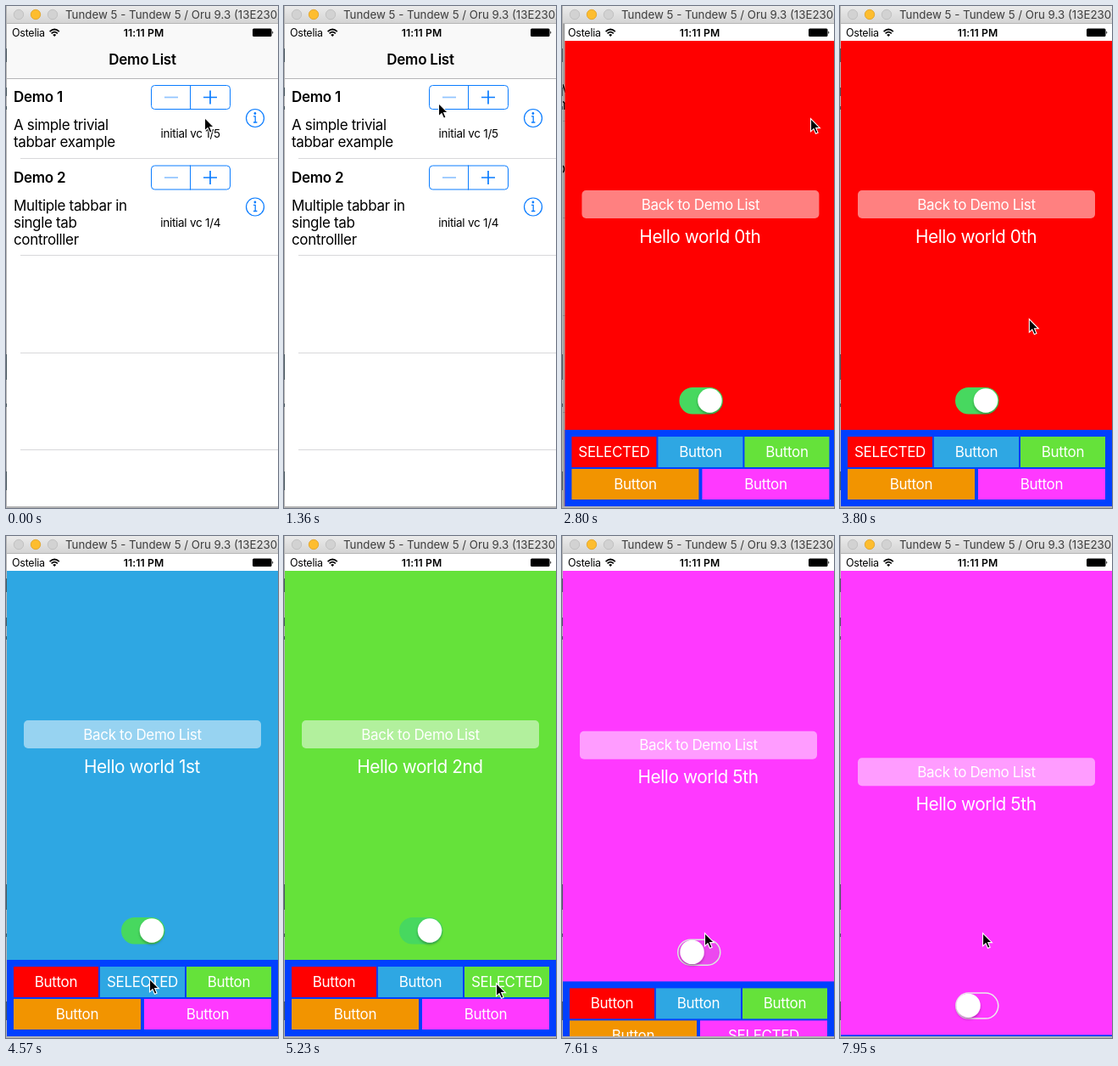
These frames come from a looping animation (321 by 591 pixels, 8000 ms). An HTML page:

```html
<!DOCTYPE html>
<html lang="en">
<head>
<meta charset="utf-8">
<title>Tab bar demo</title>
<style>
  html, body { margin: 0; width: 100%; height: 100%; overflow: hidden; background: #fff; }
  svg { display: block; width: 321px; height: 591px; }
  text { font-family: Inter, Roboto, sans-serif; font-size: 17px; letter-spacing: -.02em; white-space: pre; }
  .mid { text-anchor: middle; }
  .bold { font-weight: 600; letter-spacing: -.015em; }
  .light { fill: #fff; }
  .tint { stroke: #0a7cff; fill: none; }
</style>
</head>
<body>
<svg id="stage" viewBox="0 0 321 591">
  <defs>
    <clipPath id="screenClip"><rect x="1" y="21" width="320" height="568"/></clipPath>
    <linearGradient id="bar" x2="0" y2="1">
      <stop stop-color="#ebebeb"/><stop offset="1" stop-color="#d3d3d3"/>
    </linearGradient>
    <linearGradient id="edge">
      <stop stop-opacity="0"/><stop offset="1" stop-opacity=".35"/>
    </linearGradient>
    <filter id="soft" x="-30%" y="-30%" width="160%" height="180%">
      <feDropShadow dx="0" dy="2" stdDeviation="1.5" flood-opacity=".3"/>
    </filter>
  </defs>
  <rect width="321" height="591" fill="#b4b4b4"/>
  <path d="M.5 50v16M.5 96v10M.5 118v4M.5 410v30M.5 468v4M.5 548v22" stroke="#4b5a60"/>
  <g clip-path="url(#screenClip)">
    <rect width="321" height="591" fill="#fff"/>
    <g id="list"></g>
    <g id="nav">
      <rect y="21" width="321" height="64" fill="#f9f9f9"/>
      <path d="M0 85.5H321" stroke="#b5b5b8"/>
      <text class="mid bold" x="161" y="69">Demo List</text>
    </g>
    <rect id="dim" y="21" width="321" height="570"/>
    <g id="page">
      <rect x="-9" y="21" width="10" height="570" fill="url(#edge)"/>
      <rect x="1" y="21" width="320" height="20" fill="#fff"/>
      <rect id="fill" x="1" y="41" width="320" height="550"/>
      <g id="center">
        <rect x="21" y="217" width="280" height="33" rx="5" fill="#fff" fill-opacity=".5"/>
        <text class="mid light" x="161" y="239.5">Back to Demo List</text>
        <text id="hello" class="mid light" x="160.5" y="278.7" style="font-size:20.8px"></text>
      </g>
      <g id="toggle">
        <rect id="track" x="136.75" y="449.75" width="50" height="30" rx="15" stroke-width="1.5"/>
        <circle id="knob" cy="464.5" r="14.2" fill="#fff" filter="url(#soft)"/>
      </g>
      <g id="tabs"><rect x="1" y="499" width="320" height="90" fill="#0040ff"/></g>
    </g>
    <g id="status">
      <text x="7" y="35.5" style="font-size:12.5px">Ostelia</text>
      <text class="mid bold" x="162.5" y="35.5" style="font-size:12.2px;letter-spacing:.01em">11:11 PM</text>
      <path d="M51.6 30.2q5.6-5.4 11.2 0M53.6 32.3q3.6-3.4 7.2 0" fill="none" stroke="#000" stroke-width="1.7"/>
      <path d="M57.2 36l-2-2.1q2-1.7 4 0z"/>
      <rect x="291" y="26.5" width="22.5" height="9.5" rx="1.5"/>
      <path d="M314.3 29.5q2 1.7 0 3.4z"/>
    </g>
  </g>
  <rect x="1" width="320" height="21" fill="url(#bar)"/>
  <path d="M1 20.5H321" stroke="#b6b6b6"/>
  <g stroke-width=".8">
    <circle cx="15" cy="10" r="5.7" fill="#d2d2d2" stroke="#bcbcbc"/>
    <circle cx="35" cy="10" r="5.7" fill="#fdbd2f" stroke="#dfa023"/>
    <circle cx="55" cy="10" r="5.7" fill="#d2d2d2" stroke="#bcbcbc"/>
  </g>
  <text x="70" y="15" fill="#3d3d3d" style="font-size:13.3px;letter-spacing:0">Tundew 5 - Tundew 5 / Oru 9.3 (13E230)</text>
  <path id="cursor" d="M0 0V15.3L3.5 12.1 6 17.8 8.6 16.7 6.2 11.1H10.9Z" stroke="#fff" stroke-width="1.1"/>
</svg>
<script>
const LOOP = 8000, PUSH = 2420, HIDE = 7410;
const $ = id => document.getElementById(id);
const move = (el, x, y) => el.setAttribute('transform', `translate(${x} ${y})`);
const clamp = v => Math.min(1, Math.max(0, v));
const ease = v => v * v * (3 - 2 * v);
const span = (t, from, to) => ease(clamp((t - from) / (to - from)));

// start, end, x, y
const moves = [
  [50, 280, 234, 108], [950, 1120, 182, 114], [1400, 1650, 302, 140],
  [1850, 2060, 293, 132], [2960, 3210, 262, 257], [3470, 4210, 169, 521],
  [4710, 4990, 250, 526], [5340, 5750, 80, 557], [6060, 6390, 217, 563],
  [6620, 7140, 168, 467]
];

// selected at, colour, ordinal, x, y, width
const tabs = [
  [0, '#ff0000', '0th', 9, 507, 100], [4570, '#2ea7e3', '1st', 111, 507, 100],
  [5230, '#65e23a', '2nd', 213, 507, 100], [6040, '#f29400', '3rd', 9, 545, 150],
  [6560, '#ff39ff', '5th', 163, 545, 150]
];

const cell = (n, y, lines, noteY, infoY) => `
  <text class="bold" x="9" y="${y + 28}">Demo ${n}</text>
  ${lines.map((s, i) => `<text x="9" y="${y + 61 + i * 20.3}">${s}</text>`).join('')}
  <g class="tint">
    <rect x="171.5" y="${y + 8.5}" width="93" height="28" rx="4"/>
    <path d="M217.5 ${y + 8}v29"/>
    <path d="M233 ${y + 22.5}h16m-8-8v16" stroke-width="1.7"/>
    <path id="minus${n}" d="M187 ${y + 22.5}h16" stroke-width="1.7" opacity=".45"/>
    <circle cx="294" cy="${infoY}" r="10.5" stroke-width="1.2"/>
    <path d="M292 ${infoY - 2.2}h2.2v7m-2.2 .2h4.4" stroke-width="1.3"/>
  </g>
  <circle cx="293.9" cy="${infoY - 5.5}" r="1.4" fill="#0a7cff"/>
  <text id="note${n}" class="mid" x="217.7" y="${noteY}" style="font-size:13.5px">initial vc 1/${6 - n}</text>`;

$('list').innerHTML =
  cell(1, 85, ['A simple trivial', 'tabbar example'], 155, 132) +
  cell(2, 179.5, ['Multiple tabbar in', 'single tab', 'controlller'], 259.5, 236.5) +
  [179.5, 293.5, 408.5, 522.5].map(y => `<path d="M17 ${y}H321" stroke="#d8d8da"/>`).join('');

$('tabs').innerHTML += tabs.map(([, color, , x, y, w]) => `
  <rect x="${x}" y="${y}" width="${w}" height="36" fill="${color}"/>
  <text class="mid light" x="${x + w / 2}" y="${y + 24}"></text>`).join('');
const tabLabels = $('tabs').querySelectorAll('text');

function drawCursor(t) {
  let x = 234.5, y = 131.5;
  for (const [from, to, nx, ny] of moves) {
    const p = span(t, from, to);
    x += (nx + .5 - x) * p;
    y += (ny + .5 - y) * p;
  }
  move($('cursor'), x, y);
}

function drawList(t, slide) {
  const second = t >= 580 && t < 1360;
  $('note1').textContent = `initial vc ${second ? 2 : 1}/5`;
  $('minus1').setAttribute('opacity', second ? 1 : .45);
  const pushed = t >= PUSH;
  $('nav').style.display = pushed ? 'none' : '';
  move($('list'), -96 * (1 - slide), pushed ? -44 : 0);
  $('dim').setAttribute('opacity', .1 * (1 - slide));
}

function drawPage(t, slide) {
  $('page').style.display = t < PUSH ? 'none' : '';
  move($('page'), 320 * slide, 0);
  const current = tabs.findLast(([at]) => t >= at);
  $('fill').setAttribute('fill', current[1]);
  $('hello').textContent = 'Hello world ' + current[2];
  tabs.forEach((tab, i) => tabLabels[i].textContent = tab === current ? 'SELECTED' : 'Button');

  const drop = span(t, HIDE, HIDE + 570);
  move($('center'), 0, 44.5 * drop);
  move($('toggle'), 0, 89 * drop);
  move($('tabs'), 0, 89 * drop);

  const off = span(t, HIDE, HIDE + 250);
  $('knob').setAttribute('cx', 172 - 20.5 * off);
  $('track').setAttribute('fill', `rgba(71,216,95,${1 - off})`);
  $('track').setAttribute('stroke', `rgb(${71 + 165 * off},${216 + 20 * off},${95 + 141 * off})`);
}

function draw(now) {
  const t = now % LOOP;
  // critically damped spring
  const s = Math.max(0, t - PUSH) * .01826;
  const slide = s > 12 ? 0 : (1 + s) * Math.exp(-s);
  drawCursor(t);
  drawList(t, slide);
  drawPage(t, slide);
}

const start = performance.now();
function tick() {
  draw(performance.now() - start);
  requestAnimationFrame(tick);
}
tick();
</script>
</body>
</html>
```
